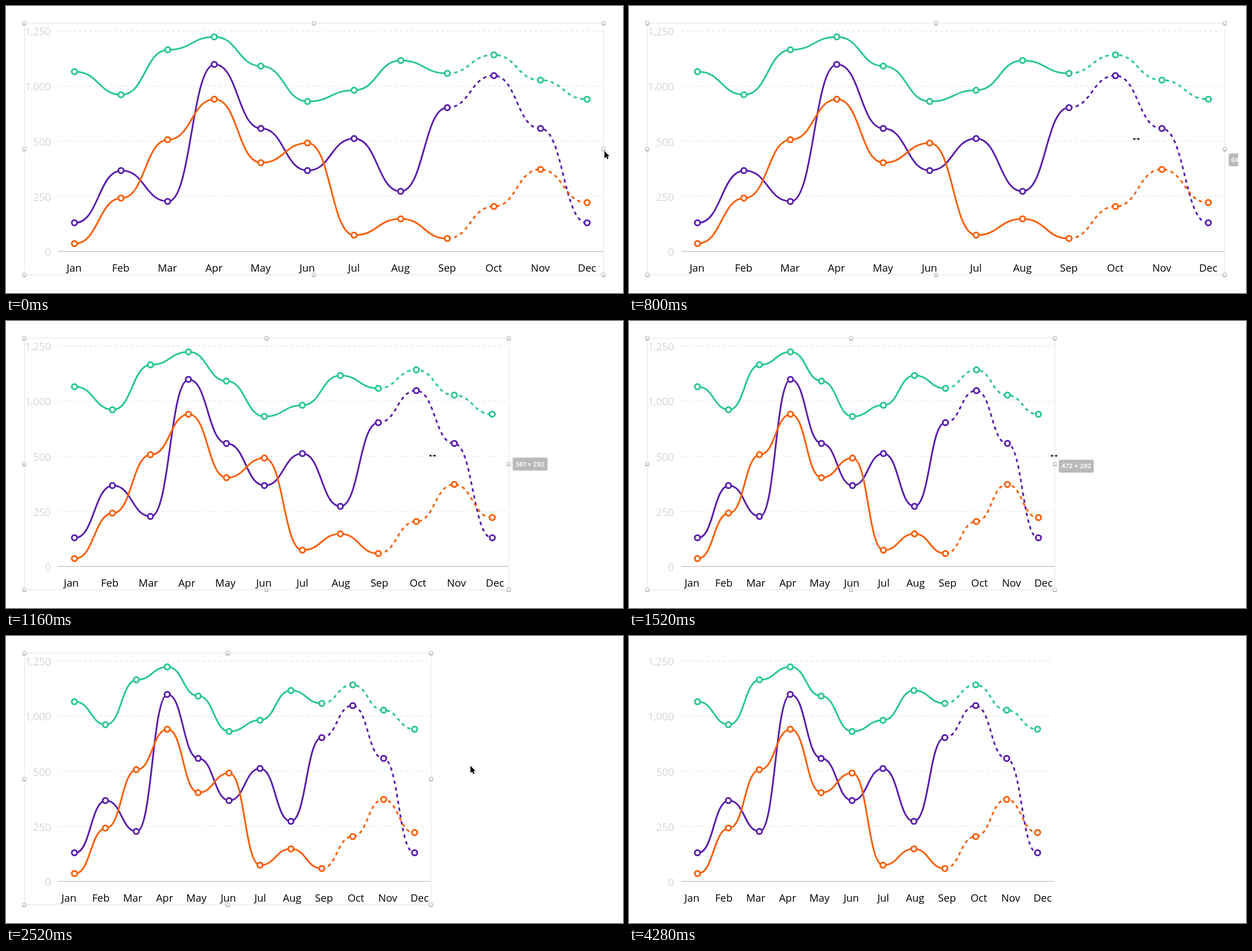
Recreate the animation shown at these times as an HTML page. Size 1096 by 511 pixels, loop 5280 ms.

```html
<!DOCTYPE html>
<html lang="en">
<head>
<meta charset="utf-8">
<title>Resizable line chart</title>
<style>
  html, body { margin: 0; width: 100%; height: 100%; overflow: hidden; background: #fff; }
  svg { display: block; }
  .axis text { font: 300 18.4px "Open Sans", sans-serif; fill: #bfbfbf; text-anchor: end; }
  .months text { font: 400 18.4px "Open Sans", sans-serif; fill: #000; text-anchor: middle; }
  .grid { stroke: #e6e6e6; stroke-width: 1.3; stroke-dasharray: 4.6 4.6; }
  .base { stroke: #c4c4c4; stroke-width: 1.5; }
  .series path { fill: none; stroke-width: 3.07; }
  .series .forecast { stroke-dasharray: 6.1 6.1; }
  .series circle { fill: #fff; stroke-width: 3.07; }
  .frame { fill: none; stroke: #e3e3e3; stroke-width: 1; }
  .shade { fill: #000; opacity: .18; }
  .handle { fill: url(#knob); stroke: #b4b4b4; stroke-width: 1; }
  .badge rect { fill: #b9b9b9; }
  .badge text { font: 600 10.8px Inter, sans-serif; fill: #fff; text-anchor: middle; }
  .pointer { stroke: #fff; stroke-width: 1; paint-order: stroke; }
</style>
</head>
<body>
<svg id="stage" width="1096" height="511" viewBox="0 0 1096 511">
  <defs>
    <linearGradient id="knob" x1="0" y1="0" x2="0" y2="1">
      <stop offset="0" stop-color="#fff"/>
      <stop offset="1" stop-color="#dedede"/>
    </linearGradient>
    <clipPath id="view"><rect width="1082" height="511"/></clipPath>
  </defs>
</svg>
<script>
const LOOP = 5280, TICK = 40, LAG = 346;
const LEFT = 32.5, TOP = 30.5, HEIGHT = 448;
const WIDE = 1061.5, NARROW = 755, FIRST = 121.6, SCALE = 1.534;

const stage = document.getElementById('stage');

function set(el, attrs) {
  for (const key in attrs) el.setAttribute(key, attrs[key]);
}

function add(parent, tag, attrs = {}, text = '') {
  const el = document.createElementNS('http://www.w3.org/2000/svg', tag);
  set(el, attrs);
  el.textContent = text;
  return parent.appendChild(el);
}

const show = (el, on) => { el.style.display = on ? '' : 'none'; };
const move = (el, x, y) => set(el, { transform: `translate(${x} ${y})` });
const mix = (a, b, k) => a + (b - a) * k;
const ramp = (t, from, to) => Math.min(1, Math.max(0, (t - from) / (to - from)));
const ease = k => (1 - Math.cos(Math.PI * k)) / 2;

// Share of the resize done; the power makes it settle slightly slower than it starts
const dragAt = t => ease(ramp(t, 760, 1559) ** .913);
const edgeAt = t => mix(WIDE, NARROW, dragAt(t));

// The pointer runs ahead of the edge it drags, dipping on the way
function gripAt(t) {
  const k = dragAt(t + LAG);
  return [mix(WIDE, NARROW, k), 256 - 16 * k - 11 * Math.sin(Math.PI * k)];
}

function arrowAt(t) {
  if (t < 1000) return [1063 - 1.5 * ramp(t, 0, 160), 258 - 2 * ramp(t, 0, 160)];
  const away = ease(ramp(t, 2280, 2520)), out = ramp(t, 3720, 3840);
  return [NARROW + 70 * away - 45 * out, 240.5 - 9.5 * away - 187 * out];
}

// Axis and months
const axis = add(stage, 'g', { class: 'axis' });
const gridLines = ['1,250', '1,000', '500', '250', '0'].map((label, i) => {
  const y = 44.5 + 98.1 * i;
  add(axis, 'text', { x: 79.8, y: y + 7.8 }, label);
  return add(axis, 'line', { class: i < 4 ? 'grid' : 'base', x1: 92.5, y1: y, y2: y });
});

const monthGroup = add(stage, 'g', { class: 'months' });
const months = 'Jan Feb Mar Apr May Jun Jul Aug Sep Oct Nov Dec'.split(' ')
  .map(name => add(monthGroup, 'text', { y: 472.5 }, name));

// One height per month and line
const series = [
  ['#5a1fae', [386, 293, 348, 104, 218, 293, 236, 330, 181, 124, 218, 386]],
  ['#f95f06', [423, 342, 238, 166, 279, 244, 408, 379, 414, 357, 291, 350]],
  ['#27c793', [117, 158, 78, 55, 107, 170, 150, 97, 120, 87, 132, 166]]
].map(([color, ys]) => {
  const g = add(stage, 'g', { class: 'series', stroke: color });
  return {
    ys,
    solid: add(g, 'path'),
    forecast: add(g, 'path', { class: 'forecast' }),
    dots: ys.map(y => add(g, 'circle', { cy: y, r: 4.7 }))
  };
});

function curve(xs, ys, from, to) {
  let d = `M${xs[from]} ${ys[from]}`;
  for (let i = from + 1; i <= to; i++) {
    const mid = (xs[i - 1] + xs[i]) / 2;
    d += `C${mid} ${ys[i - 1]} ${mid} ${ys[i]} ${xs[i]} ${ys[i]}`;
  }
  return d;
}

// Selection box with a handle at each corner and side
const selection = add(stage, 'g');
const frame = add(selection, 'rect', { class: 'frame', x: LEFT, y: TOP, height: HEIGHT });
const handles = [];
for (let i = 0; i < 9; i++) {
  if (i === 4) continue;
  const g = add(selection, 'g');
  add(g, 'rect', { class: 'shade', x: -3.5, y: -2.2, width: 7, height: 6.7, rx: 1.5 });
  add(g, 'rect', { class: 'handle', x: -3, y: -3, width: 6, height: 6, rx: .8 });
  handles.push({ g, part: i % 3 / 2, y: TOP + HEIGHT * Math.floor(i / 3) / 2 });
}

// Size badge
const view = add(stage, 'g', { 'clip-path': 'url(#view)' });
const badge = add(view, 'g', { class: 'badge' });
add(badge, 'rect', { y: -11.5, width: 62, height: 23, rx: 3 });
const size = add(badge, 'text', { x: 31, y: 4 });

const arrow = add(stage, 'path', {
  class: 'pointer', d: 'M0 0V13L3 10.3 5 14.8 7.2 13.8 5.2 9.4H9Z'
});
const grip = add(stage, 'path', {
  class: 'pointer',
  d: 'M-6 0L-3 -2.5V-.6H-1.2V.6H-3V2.5ZM6 0L3 -2.5V-.6H1.2V.6H3V2.5ZM-.5 -.6H.5V.6H-.5Z'
});

function layout(right) {
  const width = right - LEFT, last = right - 29.2, shrink = WIDE - right;
  const spread = (a, b) => months.map((_, i) => mix(a, b, i / 11));
  const dotXs = spread(FIRST, last);
  const lineXs = spread(FIRST + 1.4, last - .8);
  const textXs = spread(121 - shrink * .03, 1032 - shrink * .97);

  gridLines.forEach(line => set(line, { x2: right }));
  months.forEach((el, i) => set(el, { x: textXs[i] }));
  series.forEach(({ ys, solid, forecast, dots }) => {
    set(solid, { d: curve(lineXs, ys, 0, 8) });
    set(forecast, { d: curve(lineXs, ys, 8, 11) });
    dots.forEach((dot, i) => set(dot, { cx: dotXs[i] }));
  });
  set(frame, { width });
  handles.forEach(({ g, part, y }) => move(g, LEFT + width * part, y));
  size.textContent = `${Math.round(width / SCALE)} × 292`;
}

function render(t) {
  const right = edgeAt(t);
  const dragging = t >= 160 && t < 1920;
  layout(right);
  show(selection, t < 2760);
  show(badge, t >= 720 && t < 1880);
  move(badge, right + 7, gripAt(t - LAG)[1] + 18.5);
  show(grip, dragging);
  move(grip, ...gripAt(t));
  show(arrow, !dragging && t < 3880);
  move(arrow, ...arrowAt(t));
}

function tick() {
  const t = performance.now() % LOOP;
  render(Math.floor(t / TICK) * TICK);
  requestAnimationFrame(tick);
}
tick();
</script>
</body>
</html>
```
